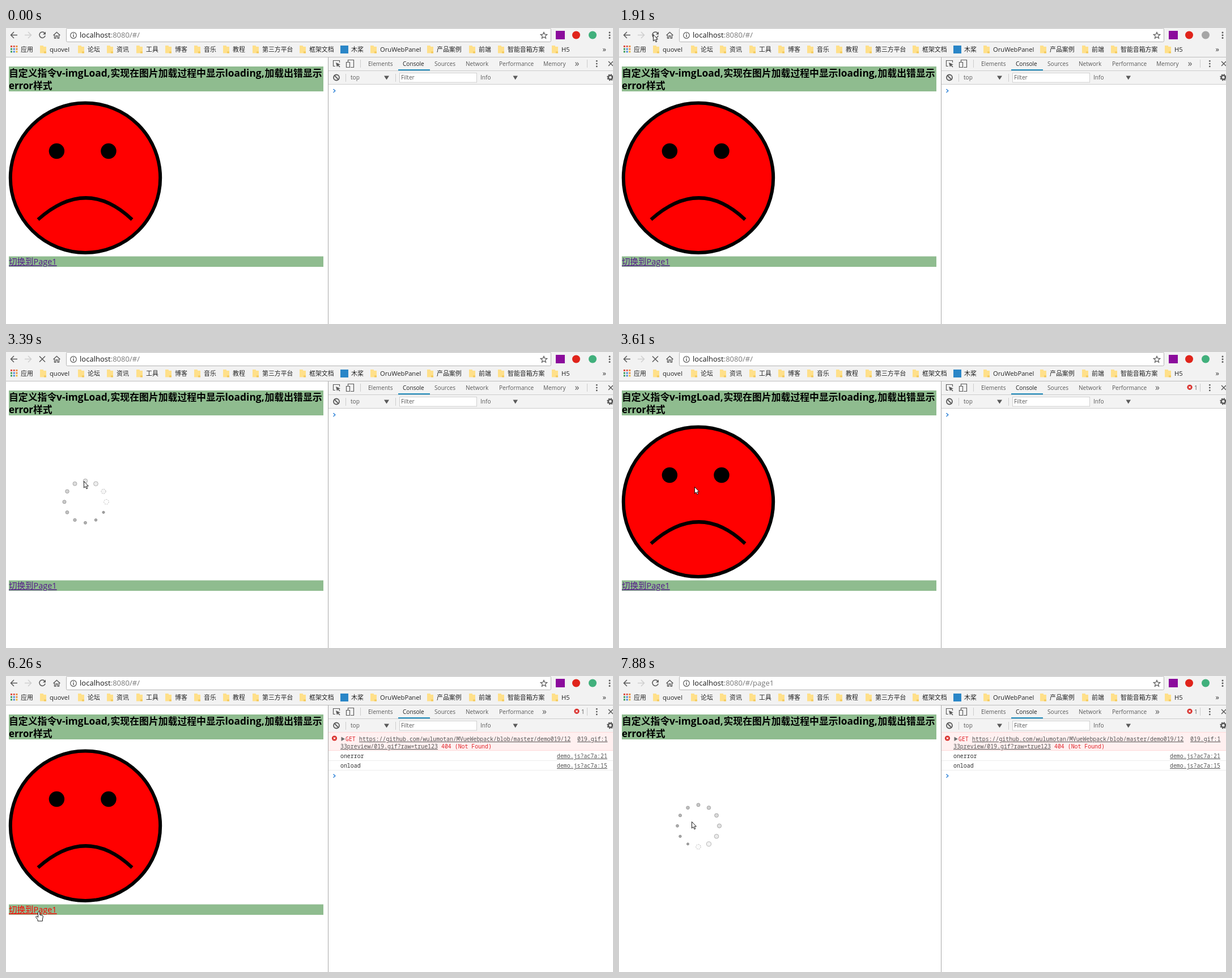
These frames come from a looping animation (1071x523 px, 8000 ms). An HTML page:

```html
<!DOCTYPE html>
<html lang="zh">
<head>
<meta charset="utf-8">
<title>v-imgLoad</title>
<style>
  html, body { margin: 0; width: 100%; height: 100%; overflow: hidden; background: #fff; }
  svg { display: block; }
  text { font-family: "Open Sans", "Noto Sans CJK SC", "Noto Sans CJK", sans-serif; white-space: pre; }
  .line { fill: none; stroke: #5a5a5a; stroke-width: 1.5; }
  .sep { stroke: #ccc; }
  .url { font-size: 13.05px; fill: #777; }
  .mark { font-size: 11.2px; fill: #222; }
  .cjk { font-size: 10.9px; }
  .title { font-weight: 700; font-size: 16.85px; }
  .title .latin { font-size: 17.4px; }
  .tool { font-size: 10.1px; fill: #5a5a5a; }
  .log { font: 9.9px "Noto Sans Mono", "DejaVu Sans Mono", monospace; fill: #303030; }
  .link { text-decoration: underline; fill: #545454; }
  .bad { fill: #e0262c; }
</style>
</head>
<body>
<svg id="stage" width="1071" height="523" viewBox="0 0 1071 523">
  <!-- browser bar -->
  <rect width="1071" height="51" fill="#f2f2f2"/>
  <path class="sep" d="M0 51.5H1071" style="stroke:#bdbdbd"/>
  <path class="line" d="M20 12.5H9M14 7L8.5 12.5L14 18"/>
  <path class="line" d="M33 12.5H44M39 7L44.5 12.5L39 18" style="stroke:#cfcfcf"/>
  <rect data-show="1750-1910" x="50" y="1" width="29" height="26" rx="2" fill="#d9d9d9"/>
  <g data-show="0-2060 3700-8000">
    <path class="line" d="M68.3 9A5.2 5.2 0 1 0 69.2 13.5"/>
    <path d="M70 6.5V11.5H65Z" fill="#5a5a5a"/>
  </g>
  <path data-show="2060-3700" class="line" d="M59 7.5L69 17.5M69 7.5L59 17.5"/>
  <path class="line" d="M83.5 13L89.5 7.5L95.5 13M85.5 12V18H88V14H91V18H93.5V12" style="stroke-width:1.3"/>
  <rect x="106.5" y=".5" width="855" height="24" rx="2" fill="#fff" stroke="#b4b4b4"/>
  <circle class="line" cx="119" cy="13" r="5.3" style="stroke-width:1.2"/>
  <path class="line" d="M119 12V16M119 9.5V11"/>
  <text class="url" x="130" y="17.3"><tspan fill="#1a1a1a">localhost</tspan>:8080/#/<tspan data-show="6420-8000">page1</tspan></text>
  <path class="line" d="M949 7.5L950.6 11.2L954.7 11.5L951.6 14.2L952.6 18.2L949 16L945.4 18.2L946.4 14.2L943.3 11.5L947.4 11.2Z" style="stroke-width:1.2"/>
  <rect x="970" y="5" width="16" height="15" fill="#8b0c9c"/>
  <circle cx="1006" cy="12.5" r="7" fill="#e0241b"/>
  <circle id="ext" cx="1035" cy="12.5" r="7"/>
  <g id="marks"></g>
  <rect x="590" y="31" width="14" height="14" fill="#2a86c7"/>

  <!-- page -->
  <rect x="5" y="68" width="555" height="44" fill="#8fbc8f"/>
  <g class="title">
    <text x="5" y="86">自定义指令</text>
    <text class="latin" x="89" y="86">v-imgLoad,</text>
    <text x="184.5" y="86">实现在图片加载过程中显示</text>
    <text class="latin" x="386.5" y="86">loading,</text>
    <text x="456.5" y="86">加载出错显示</text>
    <text x="5" y="108">error样式</text>
  </g>
  <g data-show="0-2210 3530-6420" stroke-width="6">
    <circle cx="140" cy="264.7" r="132.2" fill="#f00" stroke="#000"/>
    <circle cx="89.4" cy="217.5" r="13.7"/>
    <circle cx="181" cy="217.5" r="13.7"/>
    <path d="M56.5 338.5Q142 262 222.5 338.5" fill="none" stroke="#000"/>
  </g>
  <g id="dots" data-show="2210-3530 6420-8000" stroke="#8c8c8c" stroke-width=".9"></g>
  <g data-show="0-6420">
    <rect x="5" y="403.5" width="555" height="18.5" fill="#8fbc8f"/>
    <text id="goto" x="5" y="418.3" font-size="14.5" text-decoration="underline">切换到Page1</text>
  </g>

  <!-- developer tools -->
  <rect x="568" y="52" width="503" height="471" fill="#fff"/>
  <rect x="568" y="52" width="503" height="47" fill="#f3f3f3"/>
  <path class="sep" d="M568 75.5H1071M568 99.5H1071M625.5 56V70M1025.5 56V70M599.5 81V95M687.5 81V95"/>
  <path d="M568.5 52V523" stroke="#a8a8a8"/>
  <rect x="692" y="73" width="56" height="2.3" fill="#2a8fbd"/>
  <path class="line" d="M581 67.5H577.5V57.5H588.5V61" style="stroke-width:1.2"/>
  <path d="M582 61L590 64.4L586.8 65.4L589.6 68.6L588.4 69.6L585.6 66.4L584 69Z" fill="#5a5a5a"/>
  <path class="line" d="M603.5 60V56.5H613.5V69.5H608M600.5 60.5H606.5V69.5H600.5Z" style="stroke-width:1.2"/>
  <rect x="694.5" y="79.5" width="136" height="16.5" fill="#fff" stroke="#d0d0d0"/>
  <g id="tabs"></g>
  <g data-show="0-3530">
    <text class="tool" x="948" y="67">Memory</text>
    <text class="tool" x="1003.5" y="67.5" style="font-size:16px">»</text>
  </g>
  <g data-show="3530-8000">
    <text class="tool" x="946" y="67.5" style="font-size:16px">»</text>
    <use href="#fault" x="1007" y="62.3"/>
    <text class="tool" x="1015" y="66.5">1</text>
  </g>
  <path class="line" d="M1063 59L1071 67M1071 59L1063 67"/>
  <circle class="line" cx="583" cy="87.5" r="5" style="stroke-width:1.8"/>
  <path class="line" d="M579.5 84L586.5 91" style="stroke-width:1.8"/>
  <path d="M667 84.5H676L671.5 91.5ZM894.5 84.5H903L898.7 91.5Z" fill="#5a5a5a"/>
  <circle cx="1066.3" cy="87.3" r="3.6" fill="none" stroke="#5a5a5a" stroke-width="2.6"/>
  <circle cx="1066.3" cy="87.3" r="5.2" fill="none" stroke="#5a5a5a" stroke-width="1.8" stroke-dasharray="2.1 1.98"/>
  <path data-show="0-3700" d="M577.5 108L580.8 111L577.5 114" fill="none" stroke="#2f83d8" stroke-width="1.5"/>
  <g data-show="3700-8000">
    <rect x="569" y="100" width="502" height="31" fill="#fff0f0"/>
    <path d="M569 99.5H1071M569 131.5H1071" stroke="#ffd9d9"/>
    <path d="M569 149.5H1071M569 166.5H1071" stroke="#ededed"/>
    <use href="#fault" x="579.5" y="110"/>
    <path d="M591.5 107.5V115L598 111.2Z" fill="#6e6e6e"/>
    <text class="log bad" x="599" y="115">GET</text>
    <text class="log link" x="623" y="115">https://github.com/wulumotan/MVueWebpack/blob/master/demo019/12</text>
    <text class="log link" x="590" y="128">33preview/019.gif?raw=true123</text>
    <text class="log bad" x="768" y="128">404 (Not Found)</text>
    <text class="log link" x="1008" y="115">019.gif:1</text>
    <text class="log" x="590" y="145">onerror</text>
    <text class="log link" x="972" y="145">demo.js?ac7a:21</text>
    <text class="log" x="590" y="162">onload</text>
    <text class="log link" x="972" y="162">demo.js?ac7a:15</text>
  </g>
  <path data-show="3760-8000" d="M577.5 173.5L580.8 176.5L577.5 179.5" fill="none" stroke="#2f83d8" stroke-width="1.5"/>

  <g id="pointer" fill="#fff" stroke="#000" stroke-width=".9" stroke-linejoin="round">
    <path id="arrow" d="M.5 .5V12L3.1 9.6L5 13.8L6.8 13L5 8.9H8.4Z"/>
    <path id="hand" d="M-1.5 1.5Q0 -.6 1.5 1.5V6L6 7Q7.5 7.4 7.4 9L6.4 14V17H-2V14.5L-5.5 9.8Q-5 7.8 -3.2 8.8L-1.5 10.4Z"/>
  </g>
  <defs>
    <g id="fault">
      <circle r="4.6" fill="#d9302c"/>
      <path d="M-1.7 -1.7L1.7 1.7M1.7 -1.7L-1.7 1.7" stroke="#fff" stroke-width="1.2"/>
    </g>
  </defs>
</svg>
<script>
const LOOP = 8000;
const byId = id => document.getElementById(id);

function add(parent, tag, attrs, text = '') {
  const el = document.createElementNS('http://www.w3.org/2000/svg', tag);
  for (const key in attrs) el.setAttribute(key, attrs[key]);
  el.textContent = text;
  byId(parent).append(el);
  return el;
}

// Bookmarks: label and text position; folders stand 17px to the left
const marks = [['quovel', 77], ['论坛', 144], ['资讯', 195], ['工具', 247], ['博客', 298],
  ['音乐', 349], ['教程', 400], ['第三方平台', 452], ['框架文档', 535], ['OruWebPanel', 660],
  ['产品案例', 760], ['前端', 834], ['智能音箱方案', 885], ['H5', 980]];
const label = (text, x) =>
  add('marks', 'text', { class: /\w/.test(text) ? 'mark' : 'mark cjk', x, y: 42 }, text);
for (const [text, x] of marks) {
  add('marks', 'path', { d: `M${x - 17} 31h5.5l1 2h4.5v11.5h-11z`, fill: '#ffe08a' });
  add('marks', 'path', { d: `M${x - 10} 44.5v-3h4v3z`, fill: '#f3c95c' });
  label(text, x);
}
label('应用', 26);
label('木桨', 609);
add('marks', 'text', { x: 1052.5, y: 42, 'font-size': 13, fill: '#333' }, '»');

const hues = ['#dd4b3e', '#e2574c', '#e98a3c', '#3f9d58', '#4a86d8', '#e98a3c', '#3f9d58', '#4a86d8', '#e8b93c'];
hues.forEach((fill, i) => add('marks', 'rect',
  { x: 8 + i % 3 * 4.7, y: 31 + Math.floor(i / 3) * 4.7, width: 3, height: 3, fill }));

for (const [text, x, y = 67] of [['Elements', 639], ['Console', 700], ['Sources', 756],
  ['Network', 811], ['Performance', 870], ['top', 608, 91], ['Filter', 697, 91], ['Info', 837, 91]]) {
  const el = add('tabs', 'text', { class: 'tool', x, y }, text);
  if (text === 'Console') el.style.fill = '#222';
}
for (const i of [0, 1, 2]) {
  add('tabs', 'circle', { cx: 1065, cy: 8 + i * 4.8, r: 1.5, fill: '#5a5a5a' });
  add('tabs', 'circle', { cx: 1042.3, cy: 58.3 + i * 4.8, r: 1.4, fill: '#5a5a5a' });
}

// Loading ring, turning clockwise: each dot starts large and white, then shrinks and darkens
const TURN = 797;
const ringStarts = [2150, 6420];
const dots = Array.from({ length: 12 }, (_, i) => {
  const a = i * Math.PI / 6;
  return add('dots', 'circle', { cx: 140 + 37 * Math.sin(a), cy: 264.8 - 37 * Math.cos(a) });
});

function drawDots(t) {
  const start = ringStarts[t < ringStarts[1] ? 0 : 1];
  const head = (t - start) / TURN - 0.3;
  dots.forEach((dot, i) => {
    const age = (((head - i / 12) % 1) + 1) % 1;
    dot.setAttribute('r', 4.3 - 2.4 * age);
    dot.setAttribute('fill', `rgba(125,125,125,${0.8 * age})`);
    dot.setAttribute('stroke-opacity', 0.65 + 0.35 * age);
    dot.setAttribute('stroke-dasharray', age < 0.1 ? '2.2 1.6' : 'none');
  });
}

// Bursts of screen updates: start, end, count
const bursts = [[120, 840, 10], [930, 1580, 10], [2060, 2830, 11], [2920, 3700, 11],
  [3760, 4560, 11], [4610, 5080, 7], [5340, 5860, 8], [6420, 7210, 11], [7270, 7880, 9]];

function hold(t) {
  let held = 0;
  for (const [start, end, count] of bursts) {
    if (t < start) break;
    const step = (end - start) / (count - 1);
    held = Math.min(end, start + Math.floor((t - start) / step + 0.3) * step);
  }
  return held;
}

// Pointer track: time, x, y
const track = [[120, 952, 510], [300, 720, 383], [520, 380, 198], [700, 190, 94], [840, 104, 47],
  [1150, 80, 28], [1450, 60, 11], [2000, 60, 11], [2380, 108, 88], [2660, 148, 166], [2700, 148, 166],
  [2830, 150, 182], [3200, 143, 215], [3540, 133, 238], [3640, 133, 238], [3760, 122, 250],
  [4000, 73, 300], [4260, 112, 353], [4560, 104, 262], [4690, 102, 231], [4860, 128, 286],
  [5080, 149, 266], [5340, 142, 278], [5600, 100, 350], [5786, 58, 416], [6380, 58, 416],
  [6650, 92, 340], [6890, 133, 275], [6980, 133, 275], [7210, 112, 292], [7400, 91, 300],
  [7620, 108, 276], [7880, 128, 257]];

function pointerAt(t) {
  const i = track.findIndex(p => p[0] >= t);
  if (i < 1) return track[i < 0 ? track.length - 1 : 0].slice(1);
  const [a, b] = [track[i - 1], track[i]];
  const k = (t - a[0]) / (b[0] - a[0]);
  return [a[1] + (b[1] - a[1]) * k, a[2] + (b[2] - a[2]) * k];
}

const timed = [...document.querySelectorAll('[data-show]')].map(el =>
  [el, el.dataset.show.split(' ').map(span => span.split('-').map(Number))]);
const within = (t, a, b) => t >= a && t < b;
const toggle = (el, on) => { el.style.display = on ? '' : 'none'; };

function draw(t) {
  for (const [el, spans] of timed) toggle(el, spans.some(([a, b]) => within(t, a, b)));
  byId('ext').setAttribute('fill', within(t, 1750, 2210) ? '#a5a5a5' : '#41b07c');
  byId('goto').setAttribute('fill', within(t, 6260, 6420) ? '#f00' : '#551a8b');
  const held = hold(t);
  drawDots(held);
  const [x, y] = pointerAt(held);
  const onLink = within(t, 5000, 6420) && y > 403;
  byId('pointer').setAttribute('transform', `translate(${Math.round(x)} ${Math.round(y)})`);
  toggle(byId('pointer'), t >= 120);
  toggle(byId('hand'), onLink);
  toggle(byId('arrow'), !onLink);
}

function tick() {
  draw(performance.now() % LOOP);
  requestAnimationFrame(tick);
}
tick();
</script>
</body>
</html>
```
